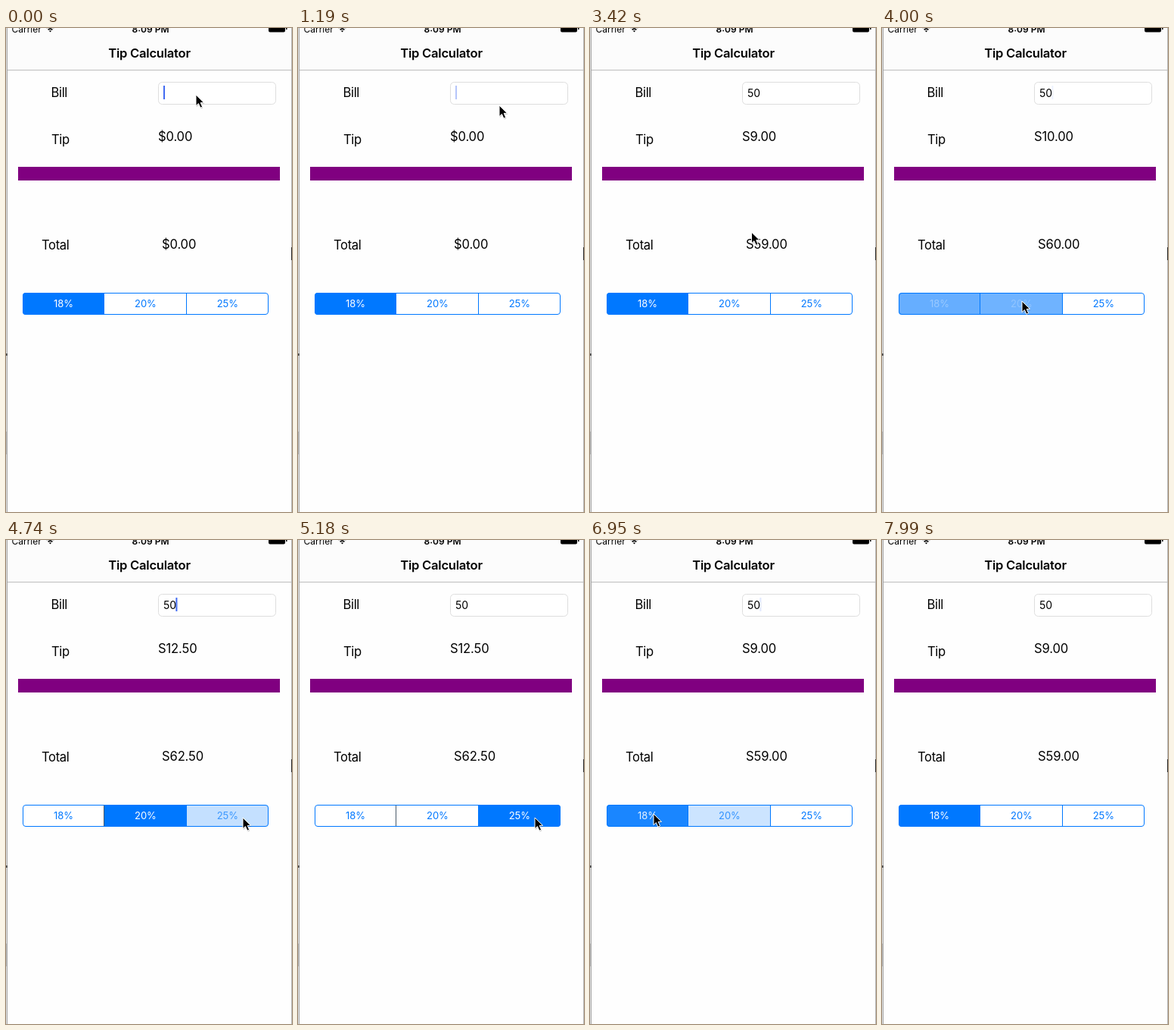
Recreate the animation shown at these times as an HTML page. Size 378 px wide and 638 px high, loop 8.14 s.

```html
<!DOCTYPE html>
<html lang="en">
<head>
<meta charset="utf-8">
<title>Tip Calculator</title>
<style>
  html, body { margin: 0; width: 100%; height: 100%; overflow: hidden; background: #fefefe; }
  svg { display: block; width: 378px; height: 638px; font: 16.6px Inter, "Open Sans", sans-serif; letter-spacing: -.35px; }
  .title { font-weight: 600; letter-spacing: -.25px; }
  .money { letter-spacing: -.15px; }
  .status { font-size: 12px; letter-spacing: 0; }
  .small { font-size: 13px; letter-spacing: -.1px; }
  .mid { text-anchor: middle; }
</style>
</head>
<body>
<svg viewBox="0 0 378 638">
  <rect width="378" height="638" fill="#fefefe"/>
  <rect width="378" height="55" fill="#fcfcfc"/>
  <rect y="55" width="378" height="1" fill="#bdbdbd"/>

  <!-- window edges -->
  <rect width="1" height="638" fill="#e4e4e4"/>
  <rect x="1" width="1" height="638" fill="#a4a4a4"/>
  <rect y="429" width="2" height="3" fill="#555"/>
  <rect y="532" width="1" height="30" fill="#bbb"/>
  <rect x="377" width="1" height="638" fill="#b4b4b4"/>
  <rect x="377" y="289" width="1" height="17" fill="#222"/>

  <!-- status bar -->
  <text class="status" x="7.5" y="6">Carrier</text>
  <path d="M53.5 0Q58.5 -4 63.5 0M55.6 2.4Q58.5 0 61.4 2.4" fill="none" stroke="#000" stroke-width="1.6"/>
  <path d="M56.9 3.8Q58.5 2.6 60.1 3.8L58.5 5.6Z"/>
  <text class="status mid" x="191" y="6" font-weight="600">8:09 PM</text>
  <path d="M347 0H369V3.5Q369 5.5 367 5.5H349Q347 5.5 347 3.5ZM370 0H371.5V2H370Z"/>

  <text class="title mid" x="189.5" y="39">Tip Calculator</text>
  <text x="59.5" y="90.5">Bill</text>
  <text x="60" y="152.5">Tip</text>
  <text x="47" y="291.5">Total</text>
  <text id="tip" class="money" x="201" y="149"></text>
  <text id="total" class="money" x="206" y="290.5"></text>
  <rect x="16" y="183" width="346" height="18" fill="#800080"/>

  <rect x="201.5" y="71.5" width="155" height="29" rx="5" fill="#fff" stroke="#dedede"/>
  <text id="bill" x="208" y="91" style="font-size:14px;letter-spacing:0"></text>
  <rect id="caret" y="76" width="2" height="18" fill="#426bf2"/>

  <clipPath id="round"><rect x="22" y="349" width="325" height="29" rx="4"/></clipPath>
  <g id="fills" clip-path="url(#round)"></g>
  <rect x="22.5" y="349.5" width="324" height="28" rx="3.5" fill="none" stroke="#0078ff"/>
  <path id="split" d="M129.5 350V377"/>
  <path d="M238.5 350V377" stroke="#0078ff"/>
  <g id="names"></g>

  <g id="cursor">
    <path d="M.8 1.8V16.2L4.2 13L6.7 18.6L9.4 17.4L7 12H11.6Z" opacity=".18"/>
    <path d="M0 0V14.6L3.4 11.5L5.9 17.2L8.6 16L6.2 10.4H10.6Z" stroke="#fff"/>
  </g>
</svg>
<script>
const STEP = 148, STEPS = 55;
const KEYS = [0, 15, 16], HOLD = 4, BLINK = 6.7, HIDE = 53;
const RATES = [18, 20, 25];
const BLUE = [0, 120, 255], WHITE = [255, 255, 255];

const taps = [
  { n: -9, seg: 0 }, { n: 26, seg: 1 }, { n: 32, seg: 2 }, { n: 41, seg: 1 }, { n: 45, seg: 0 }
];
const moves = [
  { from: 0, to: 2, x: 265, y: 101 },
  { from: 20, to: 25, x: 184, y: 359 },
  { from: 28, to: 32, x: 312, y: 365 },
  { from: 36, to: 40, x: 186, y: 360 },
  { from: 43, to: 45, x: 83, y: 360 },
  { from: 47, to: 51, x: 267, y: 568 }
];

const $ = id => document.getElementById(id);
const set = (el, attrs) => {
  for (const key in attrs) el.setAttribute(key, attrs[key]);
  return el;
};
const add = (parent, tag, attrs) =>
  $(parent).appendChild(set(document.createElementNS("http://www.w3.org/2000/svg", tag), attrs));
const clamp = v => Math.max(0, Math.min(1, v));
const ease = k => k * k * (3 - 2 * k);
const mix = (a, b, k) => `rgb(${a.map((v, i) => Math.round(v + (b[i] - v) * k))})`;

const segments = RATES.map((rate, i) => {
  const x = 22 + 108.4 * i;
  const fill = add("fills", "rect", { x: Math.round(x), y: 349, width: 109, height: 29 });
  const label = add("names", "text", { x: x + 54, y: 368, class: "small mid" });
  label.textContent = rate + "%";
  return { fill, label };
});

function pointer(n) {
  let x = 250, y = 87;
  for (const m of moves) {
    const k = ease(clamp((n - m.from) / (m.to - m.from)));
    x += (m.x - x) * k;
    y += (m.y - y) * k;
  }
  return [x + 1, y + 1];
}

// Solid after a key press, then blinking with soft edges.
function caretAlpha(n) {
  const age = n - KEYS.findLast(key => key <= n);
  if (age < HOLD) return 1;
  const p = (age - 4.46 + BLINK) / BLINK % 1;
  return clamp(Math.min((p - .45) / .2, (1 - p) / .25));
}

function draw(n) {
  const digits = KEYS.filter(key => key && key <= n).length;
  const bill = "50".slice(0, digits);
  const i = taps.findLastIndex(tap => tap.n <= n);
  const { n: since, seg } = taps[i];
  const last = i ? taps[i - 1].seg : 0;
  const tip = bill * RATES[seg] / 100;
  const money = v => (bill ? "S" : "$") + v.toFixed(2);

  $("bill").textContent = bill;
  $("tip").textContent = money(tip);
  $("total").textContent = money(+bill + tip);
  set($("caret"), { x: 208 + 8.2 * digits, opacity: caretAlpha(n) });

  const fresh = clamp((n - since + .7) / 3), old = clamp(1 - (n - since) * .4);
  const level = j => j === seg ? fresh : j === last ? old : 0;
  segments.forEach(({ fill, label }, j) => {
    set(fill, { fill: mix(WHITE, BLUE, level(j)) });
    set(label, { fill: mix(BLUE, WHITE, level(j)) });
  });
  set($("split"), { stroke: level(0) ? "#0078ff" : "#4a5a6a" });

  set($("cursor"), {
    transform: `translate(${pointer(n)})`,
    visibility: n < HIDE ? "visible" : "hidden"
  });
}

const start = performance.now();
function tick() {
  const t = performance.now() - start;
  draw(Math.floor((t + 8) / STEP) % STEPS);
  requestAnimationFrame(tick);
}
tick();
</script>
</body>
</html>
```
